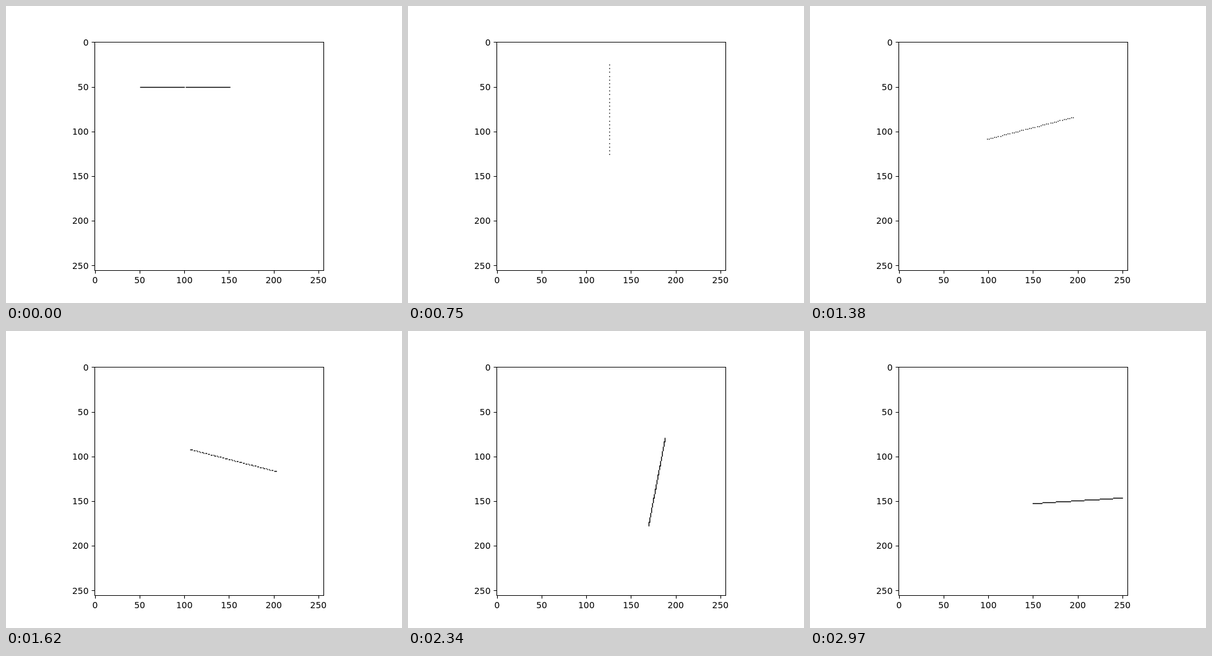
An HTML page with a canvas for the animation above (3000 ms loop, 640 by 480 pixels).

```html
<!DOCTYPE html>
<html lang="en">
<head>
<meta charset="utf-8">
<title>Rotating line</title>
<style>
  html, body { margin: 0; width: 100%; height: 100%; overflow: hidden; background: #fff; }
  canvas, svg { position: absolute; display: block; }
  canvas { left: 143px; top: 57px; }
  svg { left: 0; top: 0; }
  text { font: 13.89px "DejaVu Sans", sans-serif; fill: #000; }
  path { fill: none; stroke: #000; stroke-width: 1.11; }
</style>
</head>
<body>
<canvas id="plot" width="370" height="370"></canvas>
<svg id="axes" width="640" height="480" viewBox="0 0 640 480"></svg>
<script>
const SIZE = 370, GRID = 256, SCALE = SIZE / GRID;
const STEP_MS = 30, STEPS = 100, HALF = 50;

function drawAxes() {
  let lines = "M143.5 58.5H513.5V427.5H143.5Z";
  let labels = "";
  for (let v = 0; v <= 250; v += 50) {
    const offset = (v + 0.5) * 1.44375;
    const x = 143.2 + offset, y = 57.6 + offset;
    lines += `M${Math.round(x) + 0.5} 427.5v5M143.5 ${Math.round(y) + 0.5}h-5`;
    labels += `<text x="${x}" y="448" text-anchor="middle">${v}</text>`;
    labels += `<text x="133.5" y="${Math.round(y + 5.3)}" text-anchor="end">${v}</text>`;
  }
  document.getElementById("axes").innerHTML = `<path d="${lines}"/>${labels}`;
}

// Grid cells of the line: it drifts one cell per step while making a full turn.
function lineCells(step) {
  const angle = step / STEPS * 2 * Math.PI;
  const dx = HALF * Math.cos(angle), dy = HALF * Math.sin(angle);
  const cx = 101 + step, cy = 51 + step;
  // The sampling density follows the distance of the tail from a fixed point.
  const reach = Math.max(Math.abs(cx - dx - 150), Math.abs(cy - dy - 50));
  const count = Math.floor(reach + 1e-9);
  const cells = new Map();
  for (let i = 0; i <= count; i++) {
    const s = 2 * i / count - 1;
    const x = Math.round(cx + s * dx), y = Math.round(cy + s * dy);
    cells.set(y * GRID + x, [x, y]);
  }
  return cells.values();
}

// Hann-weighted screen pixels touched by one grid index.
function spread(index) {
  const mid = (index + 0.5) * SCALE;
  const out = [];
  for (let p = Math.floor(mid - SCALE); p <= mid + SCALE; p++) {
    const d = Math.abs(p + 0.5 - mid) / SCALE;
    if (d < 1 && p >= 0 && p < SIZE) out.push([p, (1 + Math.cos(Math.PI * d)) / 2]);
  }
  return out;
}

const ctx = document.getElementById("plot").getContext("2d");
const image = ctx.createImageData(SIZE, SIZE);
const ink = new Float32Array(SIZE * SIZE);

function drawLine(step) {
  ink.fill(0);
  for (const [x, y] of lineCells(step)) {
    const columns = spread(x);
    for (const [py, wy] of spread(y))
      for (const [px, wx] of columns) ink[py * SIZE + px] += wx * wy;
  }
  ink.forEach((v, i) => { image.data[i * 4 + 3] = Math.round(255 * Math.min(1, v)); });
  ctx.putImageData(image, 0, 0);
}

let shown = -1;
const start = performance.now();

function tick() {
  const step = Math.floor((performance.now() - start) / STEP_MS) % STEPS;
  if (step !== shown) drawLine(shown = step);
  requestAnimationFrame(tick);
}

drawAxes();
tick();
</script>
</body>
</html>
```
